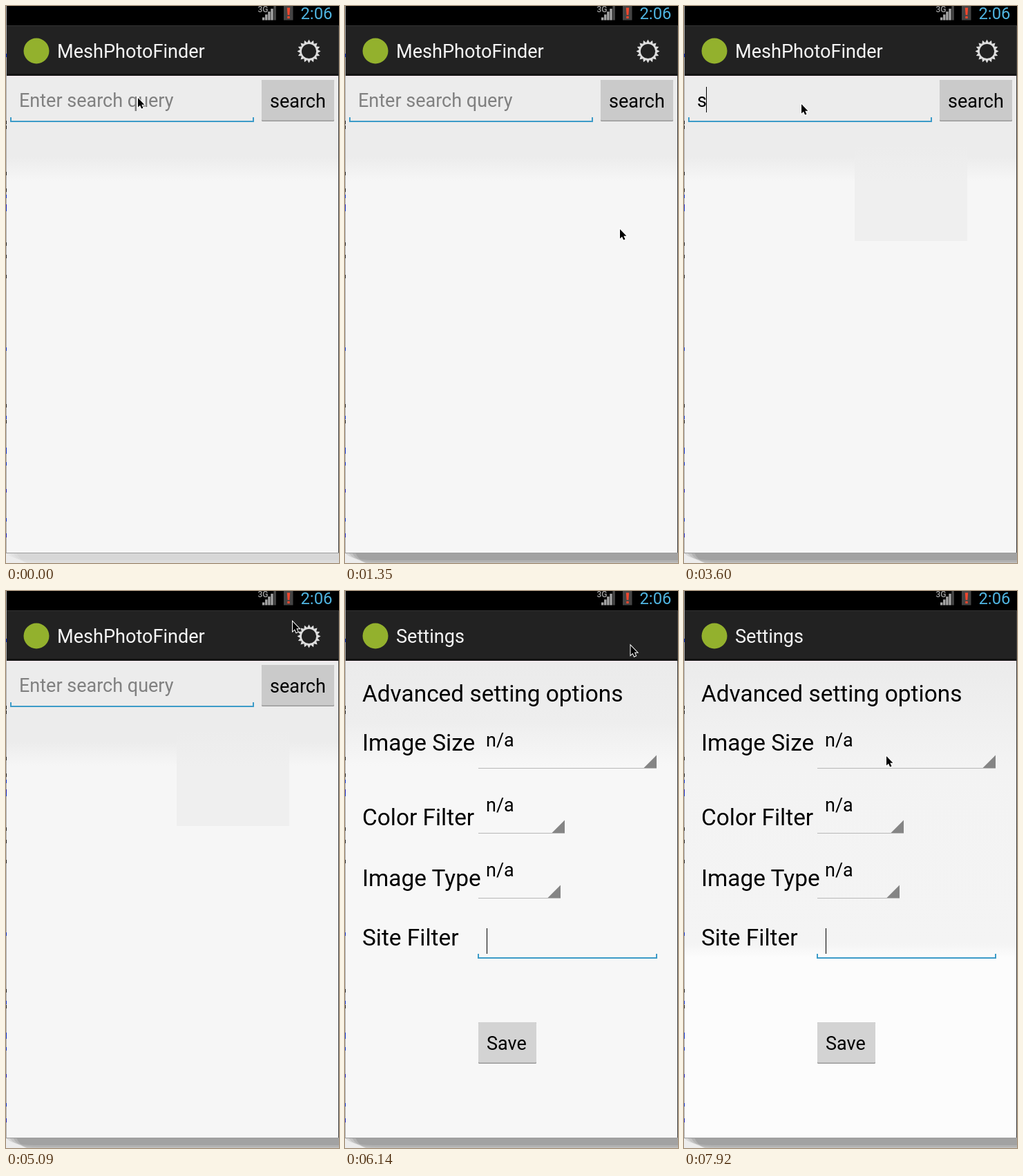
An HTML page for the animation above (8000 ms loop, 482 px wide and 806 px high).

```html
<!DOCTYPE html>
<html lang="en">
<head>
<meta charset="utf-8">
<title>Search and settings</title>
<style>
  html, body { margin: 0; width: 100%; height: 100%; overflow: hidden; background: #f6f6f6; }
  svg { display: block; width: 100vw; height: 100vh; }
  text { font-family: Roboto, "Open Sans", sans-serif; font-size: 27px; white-space: pre; }
  .large { font-size: 33.4px; }
  .title { fill: #f5f5f5; font-size: 27.1px; }
</style>
</head>
<body>
<svg id="stage" viewBox="0 0 482 806" preserveAspectRatio="none">
  <defs>
    <linearGradient id="mainFill" gradientUnits="userSpaceOnUse" x1="0" y1="0" x2="0" y2="806"></linearGradient>
    <linearGradient id="formFill" gradientUnits="userSpaceOnUse" x1="0" y1="0" x2="0" y2="806"></linearGradient>
    <linearGradient id="patchFill" x1="0" y1="0" x2="0" y2="1">
      <stop offset=".2" stop-color="#ececec"/><stop offset=".5" stop-color="#efefef"/>
    </linearGradient>
  </defs>

  <rect y="791" width="482" height="15" fill="#ececec"/>
  <g id="shadow"></g>

  <g id="main">
    <rect y="101" width="482" height="690" fill="url(#mainFill)"/>
    <rect id="patch" x="247" y="168" width="163" height="172" fill="url(#patchFill)"/>
    <g id="mainBar"></g>
    <text id="hint" x="19" y="146" fill="#808080">Enter search query</text>
    <text id="typed" x="19" y="146">s</text>
    <rect id="caret" y="117" width="1" height="37"/>
    <path id="field" fill="none"/>
    <g id="searchButton"></g>
  </g>

  <g id="form">
    <rect y="101" width="482" height="690" fill="url(#formFill)"/>
    <g id="formBar"></g>
    <g id="rows"></g>
    <rect id="formCaret" x="205" y="488" width="1" height="37"/>
    <path id="formField" fill="none"/>
    <g id="saveButton"></g>
  </g>

  <rect width="482" height="28" fill="#000"/>
  <rect y="28" width="482" height="1" fill="#333"/>
  <text x="364.5" y="8.5" fill="#a0a0a0" style="font-size:12px;font-weight:500">3G</text>
  <g id="signal"></g>
  <rect x="402" width="13.5" height="20.5" fill="#444"/>
  <path d="M406.8 2.5H411.2L410.4 13H407.6ZM407.3 14.8H410.7V18H407.3Z" fill="#f0472e"/>
  <text x="426.5" y="19" fill="#4fb4e0" style="font-size:23.8px">2:06</text>

  <rect width="1" height="791" fill="#b0b0b0"/>
  <g id="specks"></g>
  <rect x="481" y="29" width="1" height="762" fill="#3a3a3a"/>
  <rect y="791" width="482" height="1" fill="#9c9c9c"/>
  <path id="pointer" d="M0 0V13.4L3 10.7L5.2 15.6L7.5 14.6L5.3 9.8H9.4Z" stroke="#fff" stroke-width="2" paint-order="stroke"/>
</svg>
<script>
const LOOP = 8000;
const STEP = 149.4; // the screen refreshes once per step; all times below count steps
const TYPED = 21, CLEARED = 28, OPENING = 38, OPENED = 41, SETTLED = 46;

const $ = id => document.getElementById(id);
const set = (id, attrs) => {
  for (const key in attrs) $(id).setAttribute(key, attrs[key]);
};
const show = (id, on) => set(id, { visibility: on ? "inherit" : "hidden" });
const repeat = (n, make) => Array.from({ length: n }, (_, i) => make(i)).join("");

const bar = title => `
  <rect y="29" width="482" height="72" fill="#222"/>
  <rect y="98" width="482" height="3" fill="#141414"/>
  <rect y="101" width="482" height="2" fill="#f3ebef"/>
  <circle cx="44" cy="65" r="18.5" fill="#93b12d"/>
  <text class="title" x="74" y="75">${title}</text>`;

const button = (x, y, w, label, fill) => `
  <rect x="${x}" y="${y}" width="${w}" height="60" rx="1.5" fill="#999"/>
  <rect x="${x}" y="${y}" width="${w}" height="58.5" rx="1.5" fill="${fill}"/>
  <text x="${x + 12}" y="${y + 39.5}">${label}</text>`;

const spinner = (right, y) => `
  <text x="204" y="${y - 31}">n/a</text>
  <path d="M193 ${y + .5}H${right}" stroke="#b8b8b8"/>
  <path d="M${right} ${y - 18.5}V${y}H${right - 18.5}Z" fill="#858585"/>`;

const label = (text, y) => `<text class="large" x="25" y="${y}">${text}</text>`;

// Text field line with short upturned ends.
const bracket = (x1, x2, y, focused) => ({
  d: `M${x1} ${y - 6}V${y}H${x2}V${y - 6}`,
  stroke: focused ? "#3c9bc8" : "#b0b0b0",
  "stroke-width": focused ? 2 : 1
});

function gear(cx, cy, teeth) {
  const point = i => {
    const a = i * Math.PI / teeth;
    const r = i % 2 ? 12.8 : 17;
    return `${cx + r * Math.sin(a)},${cy - r * Math.cos(a)} `;
  };
  return `<polygon points="${repeat(teeth * 2, point)}" fill="#dedede"/>
    <circle cx="${cx}" cy="${cy}" r="10.6" fill="#222"/>`;
}

function random(seed) {
  return () => (seed = seed * 16807 % 2147483647) / 2147483647;
}

// Edges of the page behind the phone.
function speck() {
  const ink = ["#222", "#22b", "#13c"][Math.floor(rand() * 3)];
  return `<rect y="${60 + Math.floor(rand() * 720)}" width="1" height="5" fill="${ink}"/>`;
}

const signalBar = i => {
  const h = 4 + i * 4.2;
  return `<rect x="${371 + i * 4.1}" y="${20.5 - h}" width="3.4" height="${h}" fill="${i < 4 ? "#a6a6a6" : "#484848"}"/>`;
};

const shadowLayer = i => {
  const x = i * 5, y = 802 + i * 3;
  return `<path d="M${x} 791Q${x + 8} ${y} ${x + 40} ${y}H482V791Z"/>`;
};

const rand = random(41);
$("specks").innerHTML = repeat(22, speck);
$("signal").innerHTML = repeat(5, signalBar);
$("shadow").innerHTML = repeat(4, shadowLayer);
$("mainBar").innerHTML = bar("MeshPhotoFinder") + gear(438.5, 65.5, 16);
$("formBar").innerHTML = bar("Settings");
$("searchButton").innerHTML = button(370, 107, 105, "search", "#cacaca");
$("saveButton").innerHTML = button(193, 624, 84, "Save", "#d3d3d3");
$("rows").innerHTML =
  label("Advanced setting options", 160) +
  label("Image Size", 231) + spinner(451, 256) +
  label("Color Filter", 339) + spinner(318, 350) +
  label("Image Type", 427) + spinner(312, 444) +
  label("Site Filter", 513);
set("formField", bracket(193, 451, 531, true));

// Step, x, y of the pointer tip.
const pointerKeys = [
  [0, 191, 133], [1, 191, 133], [4, 463, 362], [9, 398, 323], [10, 247, 167], [14, 170, 142],
  [30, 170, 142], [34, 415, 44.5], [36, 449, 53], [39, 449, 53], [41, 413.5, 79],
  [46, 262, 272], [53, 293, 239]
];
function pointerAt(step) {
  const i = Math.max(1, pointerKeys.findIndex(key => key[0] >= step));
  const [s0, x0, y0] = pointerKeys[i - 1];
  const [s1, x1, y1] = pointerKeys[i];
  const p = (step - s0) / (s1 - s0);
  return [x0 + (x1 - x0) * p, y0 + (y1 - y0) * p];
}

const blink = (step, since) => step >= since && Math.floor((step - since) / 3.6) % 2 === 0;

// Vertical gradient from pairs of y and colour.
function ramp(id, ...stops) {
  $(id).innerHTML = stops.map(([y, c]) => `<stop offset="${y / 806}" stop-color="${c}"/>`).join("");
}

function paint(step) {
  if (step < OPENING) ramp("mainFill", [218, "#ececec"], [253, "#f6f6f6"]);
  else ramp("mainFill", [568, "#e9e9e9"], [602, "#f2f2f2"]);

  if (step < OPENED) ramp("formFill", [465, "#e9e9e9"], [505, "#f5f5f5"]);
  else if (step < SETTLED) ramp("formFill", [101, "#ebebeb"], [190, "#eee"], [253, "#f7f7f7"]);
  else ramp("formFill", [101, "#ebebeb"], [255, "#f3f3f3"], [510, "#f4f4f4"], [530, "#fcfcfc"]);

  set("shadow", { "fill-opacity": 1, opacity: 1, fill: `rgba(0,0,0,${step < 6 ? .025 : .09})` });
}

function draw(step) {
  paint(step);

  const typing = step >= TYPED && step < CLEARED;
  const since = typing ? TYPED : step >= CLEARED ? CLEARED : 3;
  show("hint", !typing);
  show("typed", typing);
  show("caret", step < OPENING && blink(step, since));
  set("caret", { x: typing ? 32 : 19 });
  show("patch", step >= 10 && step < OPENING);
  set("field", step < OPENING ? bracket(7, 358, 167, true) : bracket(7.5, 357.5, 166.5, false));

  const p = Math.min(1, Math.max(0, (step - OPENING) / (OPENED - OPENING)));
  const scale = .8 + .2 * p;
  show("main", p < 1);
  show("form", p > 0);
  set("form", {
    opacity: Math.min(1, 1.2 * p),
    transform: `translate(241 390) scale(${scale}) translate(-241 -390)`
  });
  show("formCaret", blink(step, OPENING));

  const [x, y] = pointerAt(step);
  set("pointer", { transform: `translate(${x} ${y})` });
  show("pointer", step < 6 || step >= 9);
}

const begin = performance.now();
let last = -1;
function tick() {
  const step = Math.floor((performance.now() - begin) % LOOP / STEP);
  if (step !== last) draw(last = step);
  requestAnimationFrame(tick);
}
tick();
</script>
</body>
</html>
```
